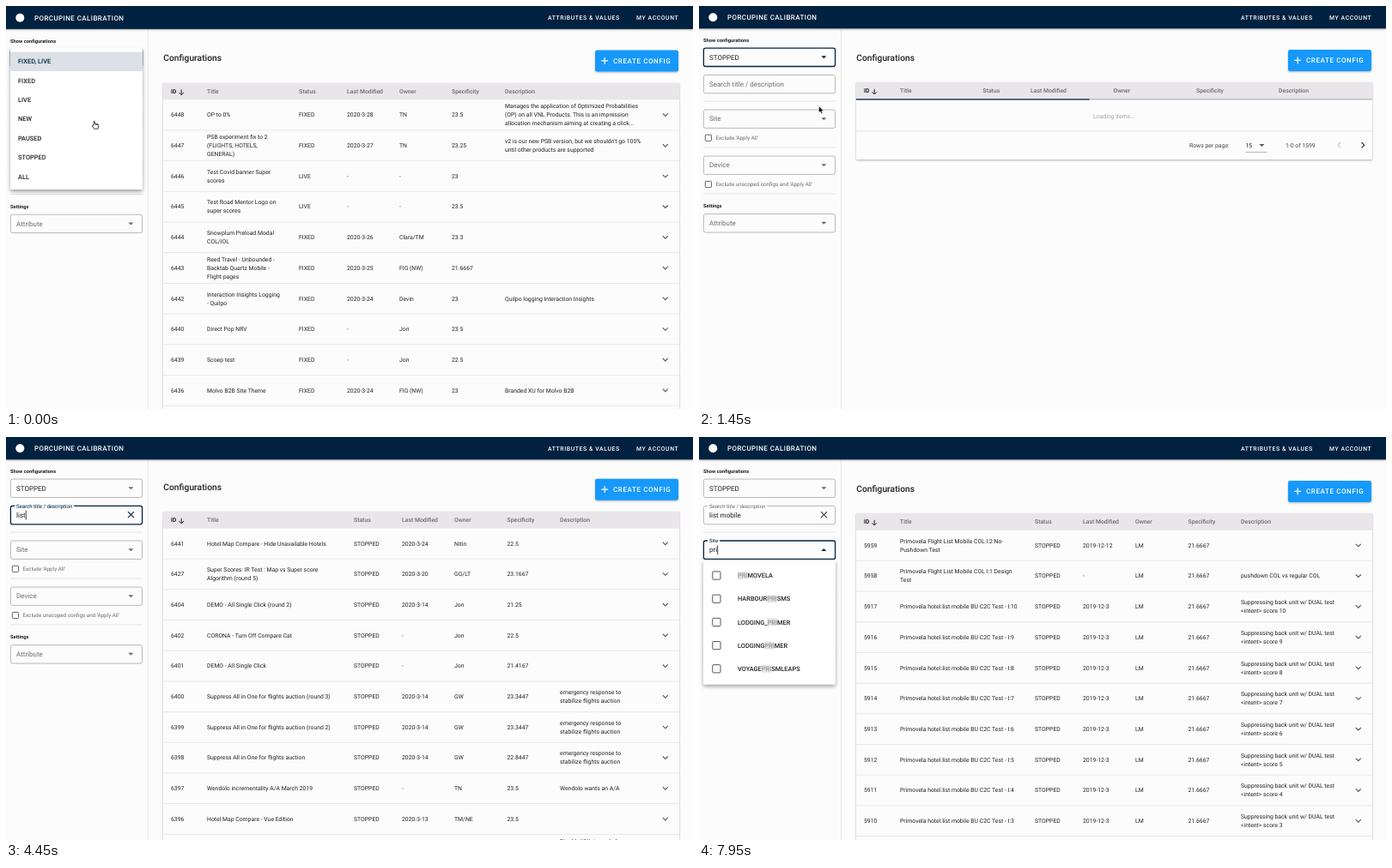
Recreate the animation shown at these times as an HTML page. Size 800 by 470 pixels, loop 8 s.

```html
<!DOCTYPE html>
<html lang="en">
<head>
<meta charset="utf-8">
<title>Configurations</title>
<style>
html, body { margin: 0; width: 100%; height: 100%; overflow: hidden; background: #fcfcfc; }
svg { display: block; width: 800px; height: 470px; font-family: Roboto, sans-serif; text-rendering: geometricPrecision; }
text { white-space: pre; }
</style>
</head>
<body>
<svg id="stage" viewBox="0 0 800 470"></svg>
<script>
const LOOP = 8000;
const NAVY = '#02233f', INK = '#222', GREY = '#6b6b6b', PAPER = '#fcfcfc';
const stage = document.getElementById('stage');
const ruler = document.createElement('canvas').getContext('2d');

const clamp = v => Math.max(0, Math.min(1, v));
const ramp = (t, from, to) => clamp((t - from) / (to - from));
const smooth = p => p * p * (3 - 2 * p);
const between = (t, from, to) => t >= from && t < to;
const escapeText = s => s.replace(/&/g, '&amp;').replace(/</g, '&lt;');

// CSS "ease" timing curve
function ease(x) {
  let lo = 0, hi = 1;
  const at = (s, a, b) => 3 * a * s * (1 - s) ** 2 + 3 * b * s * s * (1 - s) + s ** 3;
  for (let i = 0; i < 20; i++) {
    const mid = (lo + hi) / 2;
    if (at(mid, .25, .25) < x) lo = mid; else hi = mid;
  }
  return at(lo, .1, 1);
}

function widthOf(str, size, weight = 400) {
  ruler.font = `${weight} ${size * 10}px Roboto, sans-serif`;
  return ruler.measureText(str).width / 10;
}

// Text is placed by the vertical centre of its capitals
const text = (x, cy, str, size = 6.857, fill = INK, weight = 400, spacing = 0) =>
  `<text x="${x}" y="${cy + size * .356}" font-size="${size}" fill="${fill}" font-weight="${weight}" letter-spacing="${spacing}">${escapeText(str)}</text>`;
const rect = (x, y, w, h, fill, extra = '') =>
  `<rect x="${x}" y="${y}" width="${w}" height="${h}" fill="${fill}" ${extra}/>`;
const stroke = (d, color, width = 1) =>
  `<path d="${d}" fill="none" stroke="${color}" stroke-width="${width}"/>`;
const group = (content, transform, opacity = 1) =>
  `<g transform="${transform}" opacity="${opacity}">${content}</g>`;

const DEFS = `<defs>
  <filter id="low" x="-10%" y="-20%" width="120%" height="150%"><feDropShadow dx="0" dy="1" stdDeviation="1" flood-opacity=".3"/></filter>
  <filter id="high" x="-10%" y="-10%" width="120%" height="125%"><feDropShadow dx="0" dy="2.5" stdDeviation="2.3" flood-opacity=".36"/></filter>
  <clipPath id="stoppedRow"><rect x="5" y="164.7" width="154" height="22.4"/></clipPath>
</defs>`;

// ---------- Tables ----------
const HEADINGS = ['ID', 'Title', 'Status', 'Last Modified', 'Owner', 'Specificity', 'Description'];
const ROW = 35.7;
const parseRows = src => src.trim().split('\n').map(line => line.split(';'));

const fixedLive = {
  columns: [192, 234, 341, 397, 458, 519, 581],
  rows: parseRows(`
6448;OP to 0%;FIXED;2020-3-28;TN;23.5;Manages the application of Optimized Probabilities|(OP) on all VNL Products. This is an impression|allocation mechanism aiming at creating a click...
6447;PSB experiment fix to 2|(FLIGHTS, HOTELS,|GENERAL);FIXED;2020-3-27;TN;23.25;v2 is our new PSB version, but we shouldn't go 100%|until other products are supported
6446;Test Covid banner Super|scores;LIVE;-;-;23;
6445;Test Road Mentor Logo on|super scores;LIVE;-;-;23.5;
6444;Snowplum Preload Modal|COL/IOL;FIXED;2020-3-26;Clara/TM;23.3;
6443;Reed Travel - Unbounded -|Backtab Quartz Mobile -|Flight pages;FIXED;2020-3-25;FIG (NW);21.6667;
6442;Interaction Insights Logging|- Quilpo;FIXED;2020-3-24;Devin;23;Quilpo logging Interaction Insights
6440;Direct Pop NRV;FIXED;-;Jon;23.5;
6439;Scoep test;FIXED;-;Jon;22.5;
6436;Molvo B2B Site Theme;FIXED;2020-3-24;FIG (NW);23;Branded XU for Molvo B2B`)
};

const stopped = {
  columns: [192, 234, 405, 461, 522, 583.5, 645],
  rows: parseRows(`
6441;Hotel Map Compare - Hide Unavailable Hotels;STOPPED;2020-3-24;Nitin;22.5;
6427;Super Scores: IR Test : Map vs Super score|Algorithm (round 5);STOPPED;2020-3-20;GG/LT;23.1667;
6404;DEMO - All Single Click (round 2);STOPPED;2020-3-14;Jon;21.25;
6402;CORONA - Turn Off Compare Cat;STOPPED;-;Jon;22.5;
6401;DEMO - All Single Click;STOPPED;-;Jon;21.4167;
6400;Suppress All in One for flights auction (round 3);STOPPED;2020-3-14;GW;23.3447;emergency response to|stabilize flights auction
6399;Suppress All in One for flights auction (round 2);STOPPED;2020-3-14;GW;23.3447;emergency response to|stabilize flights auction
6398;Suppress All in One for flights auction;STOPPED;2020-3-14;GW;22.8447;emergency response to|stabilize flights auction
6397;Wendolo incrementality A/A March 2019;STOPPED;-;TN;23.5;Wendolo wants an A/A
6396;Hotel Map Compare - Vue Edition;STOPPED;2020-3-13;TM/NE;23.5;
6395;;;;;;Disable VNL to exclude|auction from|flights`)
};

const scoreRow = n => [`${5907 + n}`, `Primovela hotel.list mobile BU C2C Test - I:${n}`, 'STOPPED', '2019-12-3', 'LM', '21.6667',
  `Suppressing back unit w/ DUAL test|<intent> score ${n}`];
const listMobile = {
  columns: [192, 234, 391, 447, 508, 569.5, 631],
  rows: [
    ...parseRows(`
5959;Primovela Flight List Mobile COL I:2 No-|Pushdown Test;STOPPED;2019-12-12;LM;21.6667;
5958;Primovela Flight List Mobile COL I:1 Design|Test;STOPPED;-;LM;21.6667;pushdown COL vs regular COL`),
    ...[10, 9, 8, 7, 6, 5, 4, 3].map(scoreRow)
  ]
};

const tableHead = columns =>
  rect(183, 89, 601, 19.8, '#e8e6e9') +
  HEADINGS.map((h, i) => text(columns[i], 98.7, h, 6.857, i ? GREY : INK, i ? 500 : 700)).join('') +
  stroke('M204.2 96.8V103M201.4 100.2L204.2 103L207 100.2', INK, 1);

function tableScreen({ columns, rows }) {
  const body = rows.map((cells, r) => {
    const cy = 126.3 + ROW * r;
    const content = cells.map((cell, c) => {
      const lines = cell.split('|');
      return lines.map((line, i) => text(columns[c], cy + (i - (lines.length - 1) / 2) * 10, line)).join('');
    }).join('');
    return content + stroke(`M764.8 ${cy - 1.5}L767.8 ${cy + 1.5}L770.8 ${cy - 1.5}`, '#555', 1.1) +
      stroke(`M183 ${cy + 18}H784`, '#dedede', .7);
  }).join('');
  return rect(183, 89, 601, 420, PAPER, 'filter="url(#low)"') + tableHead(columns) + body;
}

function loadingScreen(elapsed, total, dx) {
  const e = ease(clamp(elapsed / 1320));
  const left = clamp(-2 + 3.07 * e) * 601, right = clamp(1.08 * e) * 601;
  return rect(183, 89, 601, 90, PAPER, 'filter="url(#low)"') +
    tableHead([192, 234, 330.5, 386, 482.5, 579, 675]) +
    rect(183, 108.3, 601, 1.2, NAVY, 'opacity=".3"') +
    rect(183 + left, 108.3, right - left, 1.2, NAVY) +
    text(459, 128.2, 'Loading items...', 6.857, '#a0a0a0') +
    stroke('M183 146H784', '#dedede', .7) +
    text(571 + dx, 162.5, 'Rows per page:', 6.857, '#444') +
    text(636.5 + dx, 162.5, '15') +
    rect(636.5 + dx, 170.3, 25, .6, '#888') +
    `<path d="M${652.4 + dx} 161h6l-3 3z" fill="#555"/>` +
    text(683 + dx, 162.5, `1-0 of ${total}`, 6.857, '#444') +
    stroke('M747 159L744 162.2L747 165.4', '#aaa', 1) +
    stroke('M771.5 159L774.7 162.2L771.5 165.4', '#333', 1.2);
}

const screens = { fixedLive, stopped, listMobile };
for (const name in screens) screens[name] = tableScreen(screens[name]);

const LOAD_1 = 1115, DONE_1 = 2100, LOAD_2 = 5915, DONE_2 = 6350;

function page(t) {
  let table = screens.listMobile;
  if (t < LOAD_1) table = screens.fixedLive;
  else if (t < DONE_1) table = loadingScreen(t - LOAD_1, 1599, 0);
  else if (t < LOAD_2) table = screens.stopped;
  else if (t < DONE_2) table = loadingScreen(t - LOAD_2, 993, 4);
  const scroll = t < LOAD_2 ? 2.2 * smooth(ramp(t, 2750, 2900)) : 0;
  return group(
    text(183.3, 60.2, 'Configurations', 10.29, INK, 500) +
    rect(686, 51, 97, 25, '#1499fb', 'rx="2.3" filter="url(#low)"') +
    stroke('M693.3 63.3H701.1M697.2 59.4V67.2', '#fff', 1.2) +
    text(707, 63.5, 'CREATE CONFIG', 8, '#fff', 500, .6) + table,
    `translate(0 ${-scroll})`);
}

// ---------- Sidebar ----------
const arrow = (cy, color, up) =>
  `<path d="M142.4 ${cy + (up ? 1.4 : -1.4)}h6l-3 ${up ? -3 : 3}z" fill="${color}"/>`;

function field(cy, { label = '', value = '', focus, hover, clear, caret, plain, up }) {
  const floating = label && (focus || value);
  const color = focus ? NAVY : hover ? '#222' : '#9c9c9c';
  let out = rect(5.4, cy - 10.6, 153.2, 21.4, PAPER, `rx="2.2" stroke="${color}" stroke-width="${focus ? 1.3 : .7}"`);
  if (floating) {
    out += rect(10, cy - 11.5, widthOf(label, 6) + 4, 2, PAPER) + text(12, cy - 10.4, label, 6, focus ? NAVY : GREY);
  } else {
    out += text(12, cy, label, 8, GREY);
  }
  out += text(12, cy, value, 8);
  if (caret) out += rect(12.2 + widthOf(value, 8), cy - 5.4, .8, 11, INK);
  if (clear) out += stroke(`M142 ${cy - 3.8}l7 7m0 -7l-7 7`, focus ? NAVY : '#444', 1.2);
  if (!plain) out += arrow(cy, focus ? NAVY : GREY, up);
  return out;
}

const checkbox = (x, cy, size, color) =>
  rect(x, cy - size / 2, size, size, 'none', `rx=".8" stroke="${color}" stroke-width="1"`);
const option = (cy, label) => checkbox(7.3, cy, 7.2, '#666') + text(19.5, cy, label, 6.286, GREY);
const divider = y => stroke(`M5 ${y}H159`, '#dcdcdc', .8);

const SEARCH = 'list mobile', QUERY = 'pri';
const searchKeys = [3950, 4090, 4200, 4330, 4580, 4700, 4790, 4880, 4960, 5050, 5140];
const siteKeys = [7500, 7650, 7780];
const SEARCH_FOCUS = 3600, SITE_FOCUS = 6950;

function typing(t, str, keys, start) {
  const count = keys.filter(k => k <= t).length;
  const since = t - (count ? keys[count - 1] : start);
  return { value: str.slice(0, count), caret: since % 1000 < 500 };
}

function sidebar(t) {
  const search = typing(t, SEARCH, searchKeys, SEARCH_FOCUS);
  const site = typing(t, QUERY, siteKeys, SITE_FOCUS);
  const searching = between(t, SEARCH_FOCUS, SITE_FOCUS), picking = t >= SITE_FOCUS;
  return rect(0, 20, 165, 460, PAPER) + rect(165, 20, .7, 460, '#dedede') +
    text(5, 40.3, 'Show configurations', 5.75, INK, 700) +
    field(59.7, { value: t < 850 ? 'FIXED, LIVE' : 'STOPPED', focus: t < SEARCH_FOCUS }) +
    field(91, { label: 'Search title / description', value: search.value, focus: searching, plain: true,
      hover: between(t, 2800, SEARCH_FOCUS), clear: search.value, caret: searching && search.caret }) +
    divider(111) +
    field(131.6, { label: 'Site', value: site.value, focus: picking, caret: picking && site.caret, up: t >= 7570 }) +
    option(153.8, "Exclude 'Apply All'") + divider(165) +
    field(185.6, { label: 'Device' }) +
    option(208, "Exclude unscoped configs and 'Apply All'") + divider(219) +
    text(5, 233.3, 'Settings', 5.75, INK, 700) +
    field(253.2, { label: 'Attribute' });
}

function statusMenu(t) {
  if (t > 1030) return '';
  const items = ['FIXED, LIVE', 'FIXED', 'LIVE', 'NEW', 'PAUSED', 'STOPPED', 'ALL'];
  const rowY = i => 64.2 + 22.35 * i;
  let out = rect(5, 48, 154, 165.5, '#fff', 'rx="2" filter="url(#high)"') + rect(5, 53, 154, 22.4, '#dbe1e6');
  if (t > 350) out += rect(5, rowY(5) - 11.2, 154, 22.4, '#f5f5f5');
  if (t > 500) {
    const fade = .24 * (1 - ramp(t, 750, 900));
    out += `<circle cx="88" cy="175.8" r="${(t - 500) * .38}" opacity="${fade}" clip-path="url(#stoppedRow)"/>`;
  }
  out += items.map((item, i) => text(14, rowY(i), item, 7.43, i ? INK : NAVY, 500)).join('');
  return group(out, '', 1 - ramp(t, 880, 1030));
}

function siteMenu(t) {
  const open = smooth(ramp(t, 7570, 7720));
  if (!open) return '';
  const query = typing(t, QUERY, siteKeys, SITE_FOCUS).value.toUpperCase();
  const items = ['PRIMOVELA', 'HARBOURPRISMS', 'LODGING_PRIMER', 'LODGINGPRIMER', 'VOYAGEPRISMLEAPS'];
  const out = rect(5, 143, 154, 145.5, '#fff', 'rx="2" filter="url(#high)"') + items.map((item, i) => {
    const cy = 161.5 + 27.2 * i, at = item.indexOf(query);
    const x = 45 + widthOf(item.slice(0, at), 7.43, 500), w = widthOf(query, 7.43, 500);
    return checkbox(15.8, cy, 9.2, '#555') + rect(x, cy - 4.4, w, 8.8, '#e2e2e2') +
      text(45, cy, item.slice(0, at), 7.43, INK, 500) + text(x, cy, query, 7.43, '#969696', 500) +
      text(x + w, cy, item.slice(at + query.length), 7.43, INK, 500);
  }).join('');
  return group(out, `translate(0 ${143 * (1 - open)}) scale(1 ${open})`, open);
}

// ---------- Header and pointer ----------
const HEADER = rect(0, -3, 800, 29.3, NAVY, 'filter="url(#low)"') +
  '<circle cx="16.3" cy="13.2" r="5" fill="#fff"/>' +
  text(33, 13.5, 'PORCUPINE CALIBRATION', 8, '#fff', 500, .4) +
  text(631, 13.4, 'ATTRIBUTES & VALUES', 6.857, '#fff', 500, .6) +
  text(734, 13.4, 'MY ACCOUNT', 6.857, '#fff', 500, .6);

const POINTERS = {
  arrow: '<path d="M-2 -3.8V4L-.2 2.4L1.1 5.2L2.5 4.6L1.3 1.9H3.7Z" fill="#000" stroke="#fff" stroke-width=".6"/>',
  beam: stroke('M-1.8 -4Q0 -4 0 -3V3Q0 4 -1.8 4M1.8 -4Q0 -4 0 -3M0 3Q0 4 1.8 4M-1 .9H1', '#222', .8),
  hand: '<path d="M-1.8 .6V-4Q-1.2 -5 -.6 -4V-1.4L3 -.7Q4 -.4 3.8 .8L3 4.6H-1.2L-3.8 1.2Q-3.6 -.1 -1.8 .6ZM.7 -1.1V.5M2.2 -.8V.6" fill="#fff" stroke="#111" stroke-width=".8"/>'
};
const path = [[0, 104, 138], [400, 90, 176], [900, 90, 176], [1450, 141.5, 120.5], [2300, 141.5, 120.5],
  [2900, 126, 89], [6450, 126, 89], [6850, 100, 131.5], [LOOP, 100, 131.5]];

function pointer(t) {
  if (between(t, 3950, 6450) || t >= 7500) return '';
  const i = path.findIndex(p => p[0] > t);
  const [t0, x0, y0] = path[i - 1], [t1, x1, y1] = path[i];
  const p = smooth(ramp(t, t0, t1));
  const beam = between(t, 300, 950) || between(t, 2750, 3950) || t > 6750;
  const shape = t < 300 ? 'hand' : beam ? 'beam' : 'arrow';
  return group(POINTERS[shape], `translate(${x0 + (x1 - x0) * p} ${y0 + (y1 - y0) * p})`);
}

function scrollbar(t) {
  const opacity = .55 * ramp(t, 2700, 2800) * (1 - ramp(t, 3250, 3400));
  return opacity ? rect(796, 1, 4, 348, '#000', `rx="2" opacity="${opacity}"`) : '';
}

function draw(now) {
  const t = now % LOOP;
  const settle = .6 * (1 - ramp(t, 0, 400));
  stage.innerHTML = DEFS + group(
    page(t) + sidebar(t) + HEADER + statusMenu(t) + siteMenu(t) + scrollbar(t) + pointer(t),
    `translate(0 ${settle})`);
}

const start = performance.now();
function tick() {
  draw(performance.now() - start);
  requestAnimationFrame(tick);
}
tick();
</script>
</body>
</html>
```
